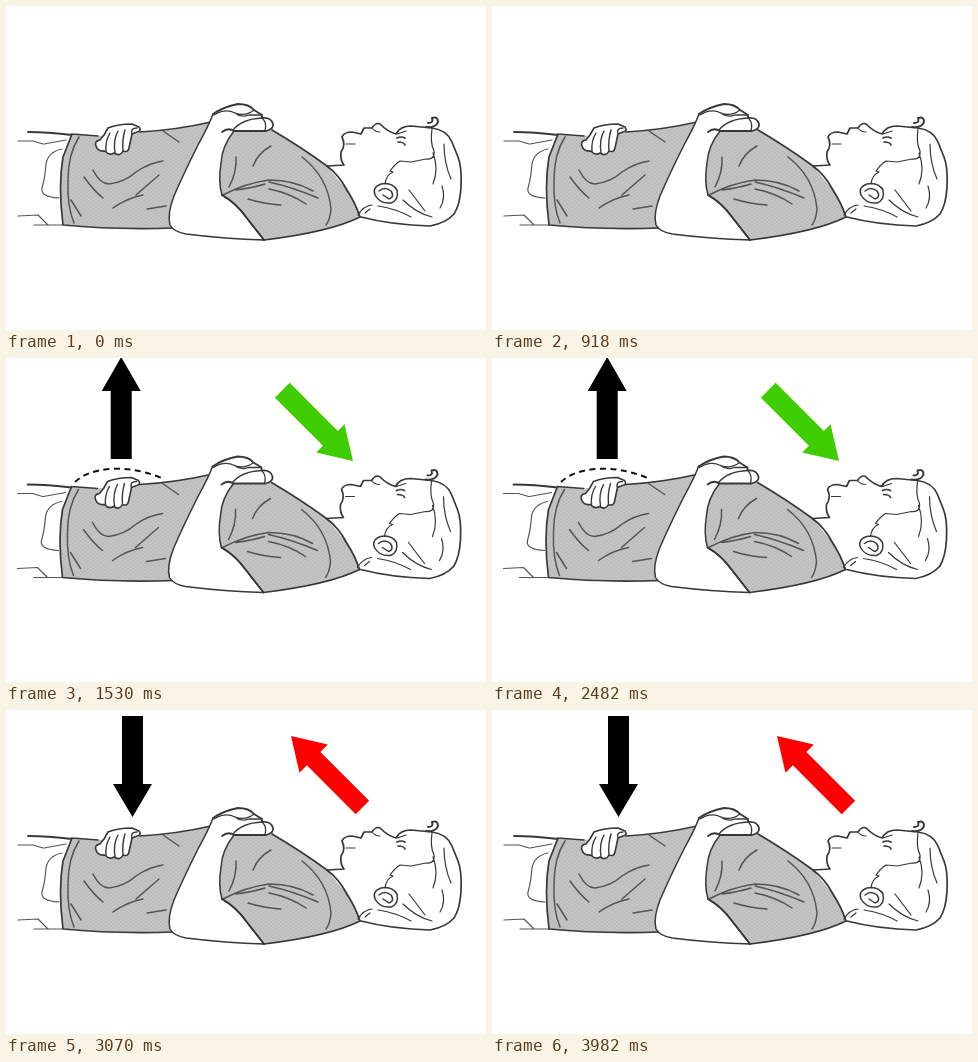
These frames come from a looping animation (480 by 324 pixels, 4590 ms). An HTML page with a canvas:

```html
<!DOCTYPE html>
<html lang="en">
<head>
<meta charset="utf-8">
<title>Breathing exercise</title>
<style>
html, body { margin: 0; width: 100%; height: 100%; overflow: hidden; background: #fff; }
canvas { display: block; width: 480px; height: 324px; }
</style>
</head>
<body>
<canvas id="stage" width="480" height="324"></canvas>
<script>
const ctx = document.getElementById('stage').getContext('2d');
const LOOP = 4590, INHALE = 1530, EXHALE = 3070;
const INK = '#383838', SOFT_INK = '#555';
const path = d => new Path2D(d);

const torso = path(`M66 128 L92 130 L134 126 Q170 124 206 116 L266 124
  Q295 141 321 160 Q333 169 341 184 L354 211 Q324 226 258 234
  L166 223 Q110 224 57 219 Q52 180 57 151 Z`);
const torsoEdges = path(`M66 128 L92 130 M134 126 Q170 124 205 116
  M266 124 Q295 141 321 160 Q333 169 341 184 Q350 198 354 211 Q324 226 258 234
  M166 222 Q110 224 57 219 Q52 180 57 151 L66 128`);
const folds = path(`M73 131 Q62 148 62 174 Q61 200 68 217
  M87 164 Q94 178 103 178 Q119 176 130 166 Q143 157 157 155
  M78 171 Q88 185 97 192 M65 194 L75 210 M107 202 Q121 192 137 189
  M130 189 L153 169 M141 203 L160 200 M157 125 L173 136
  M230 151 Q231 166 223 181 M247 160 Q252 147 265 140
  M217 189 Q240 177 263 174 Q288 174 307 185
  M230 184 Q246 182 259 178 M263 176 Q286 181 312 192
  M263 183 Q284 187 300 198 M296 151 Q322 171 325 203 Q324 214 320 219
  M242 193 Q258 198 275 199`);

const arm = path(`M207 108 Q203 119 192 139 Q177 169 168 190 Q161 208 164 219
  Q168 226 180 228 Q220 233 258 234 L240 211 Q230 197 216 189
  Q212 176 215 157 Q216 140 228 125 Z`);
const sleeve = path('M216 189 Q230 197 240 211 L258 234');
const chestHand = path(`M207 108 Q217 101 232 98 Q243 98 248 104 L256 109
  L256 112 Q265 111 267 118 Q268 123 260 125 L240 125 L228 125 Q222 121 216 126`);
const knuckles = path(`M208 109 Q219 102 229 107 Q239 111 248 104
  M229 107 Q235 112 243 109 L256 109 M227 124 Q236 113 256 112
  M257 113 Q261 117 259 125`);

const bellyHand = path(`M102 122 Q112 118 126 118 L133 121 Q136 125 131 126
  L126 128 L123 142 Q122 147 117 145 Q114 151 108 147 Q103 150 99 145
  Q92 146 90 140 Q88 135 94 134 L98 129 Z`);
const fingers = path(`M104 127 Q99 135 100 145 M112 125 Q107 134 109 147
  M119 124 Q116 134 117 145 M126 128 Q124 122 131 122`);

const legs = path(`M12 135 L27 135 L37 138 M38 138 L60 134
  M56 143 Q42 146 40 158 Q39 172 36 182 Q34 191 53 192
  M12 210 L32 209 L42 219 M28 219 L57 219`);
const waist = path('M22 126 Q42 126 66 129');

const profile = `M321 160 L338 159 Q334 154 335 146 Q340 139 336 131
  Q338 126 346 126 L355 128 L358 122 L366 122 Q370 116 374 118
  Q382 126 390 128 Q394 120 405 120 L426 122`;
const backOfHead = `Q441 124 446 136 L452 151 Q456 161 455 181
  Q454 199 448 208 Q440 217 424 220 Q386 219 355 211`;
const head = path(profile + backOfHead + ' L341 184 Z');
const face = path(profile);
const hair = path('M426 122' + backOfHead);
const curl = path('M420 121 Q430 122 432 116 Q432 110 426 112 Q428 117 422 117');
const features = path(`M340 138 L349 138 M366 122 Q369 126 374 126
  M391 128 L400 125 M426 123 Q424 137 428 145 Q429 154 420 153 L405 156
  L394 155 Q389 158 384 165 L387 166 Q380 169 379 178 M427 147 Q433 163 427 178
  M438 138 Q438 157 445 173 M403 184 L419 205
  M397 194 Q410 207 426 211 M372 200 Q391 203 405 211
  M436 180 Q440 192 434 202 M352 209 Q357 200 366 199 M359 207 L364 203`);
const eye = path('M391 132 Q395 130 399 132 M392 136 Q398 136 399 139');
const ear = path(`M369 189 Q366 181 375 178 Q386 176 391 184 Q393 194 385 197
  Q374 198 369 189 M373 185 Q379 180 385 185 Q389 191 383 193 L377 189`);
const collar = path('M321 160 Q333 169 341 184 Q350 198 354 211');

const fill = (p, color = '#fff') => { ctx.fillStyle = color; ctx.fill(p); };
function line(p, width = 1.4, color = INK) {
  ctx.lineWidth = width;
  ctx.strokeStyle = color;
  ctx.stroke(p);
}

function drawWeave() {
  ctx.save();
  ctx.clip(torso);
  ctx.lineWidth = 1;
  ctx.strokeStyle = 'rgba(255,255,255,.14)';
  ctx.beginPath();
  for (let x = -70; x < 480; x += 5) {
    ctx.moveTo(x, 110); ctx.lineTo(x + 175, 240);
    ctx.moveTo(x + 175, 110); ctx.lineTo(x, 240);
  }
  ctx.stroke();
  ctx.restore();
}

function drawMan(inhaling) {
  ctx.save();
  ctx.filter = 'blur(0.4px)';
  if (inhaling) ctx.translate(-0.5, 0.5);

  line(legs, 1.2, SOFT_INK);
  line(waist, 1.8);
  fill(torso, '#bcbcbc');
  drawWeave();
  line(torsoEdges, 1.7);
  line(folds, 1.5, SOFT_INK);

  fill(head);
  line(face, 1.7);
  line(hair, 1.7);
  line(curl, 2);
  line(features, 1.2);
  line(eye, 1.7);
  line(ear, 1.5);
  line(collar, 1.6);

  fill(arm);
  line(arm, 1.5);
  line(sleeve, 1.8);
  fill(chestHand);
  line(chestHand, 1.8);
  line(knuckles, 1.3);

  if (inhaling) ctx.translate(0, 1);
  fill(bellyHand);
  line(bellyHand, 1.6);
  line(fingers, 1.4);
  ctx.restore();
}

// Arrow with its tip at (x, y); the angle is zero when it points up.
function arrow(x, y, angle, length, head, halfHead, halfShaft, color) {
  ctx.save();
  ctx.translate(x, y);
  ctx.rotate(angle);
  fill(path(`M0 0 L${halfHead} ${head} H${halfShaft} V${length}
    H${-halfShaft} V${head} H${-halfHead} Z`), color);
  ctx.restore();
}

function draw(time) {
  const inhaling = time >= INHALE && time < EXHALE;
  ctx.fillStyle = '#fff';
  ctx.fillRect(0, 0, 480, 324);
  ctx.lineCap = ctx.lineJoin = 'round';
  drawMan(inhaling);

  if (inhaling) {
    arrow(115.2, -1, 0, 102, 34, 19.5, 10.5, '#000');
    arrow(347, 103, Math.PI * 0.75, 100, 32, 20, 10.5, '#3fcc00');
    ctx.lineCap = 'butt';
    ctx.setLineDash([6, 4.5]);
    line(path('M69 124 Q80 113 104 111 Q130 109 158 121'), 2, '#111');
    ctx.setLineDash([]);
  } else if (time >= EXHALE) {
    arrow(126.5, 107, Math.PI, 101, 33, 19.5, 10.5, '#000');
    arrow(285, 26, -Math.PI / 4, 101, 32, 20, 9.5, '#f00');
  }
}

const start = performance.now();
function tick() {
  draw((performance.now() - start) % LOOP);
  requestAnimationFrame(tick);
}
tick();
</script>
</body>
</html>
```
